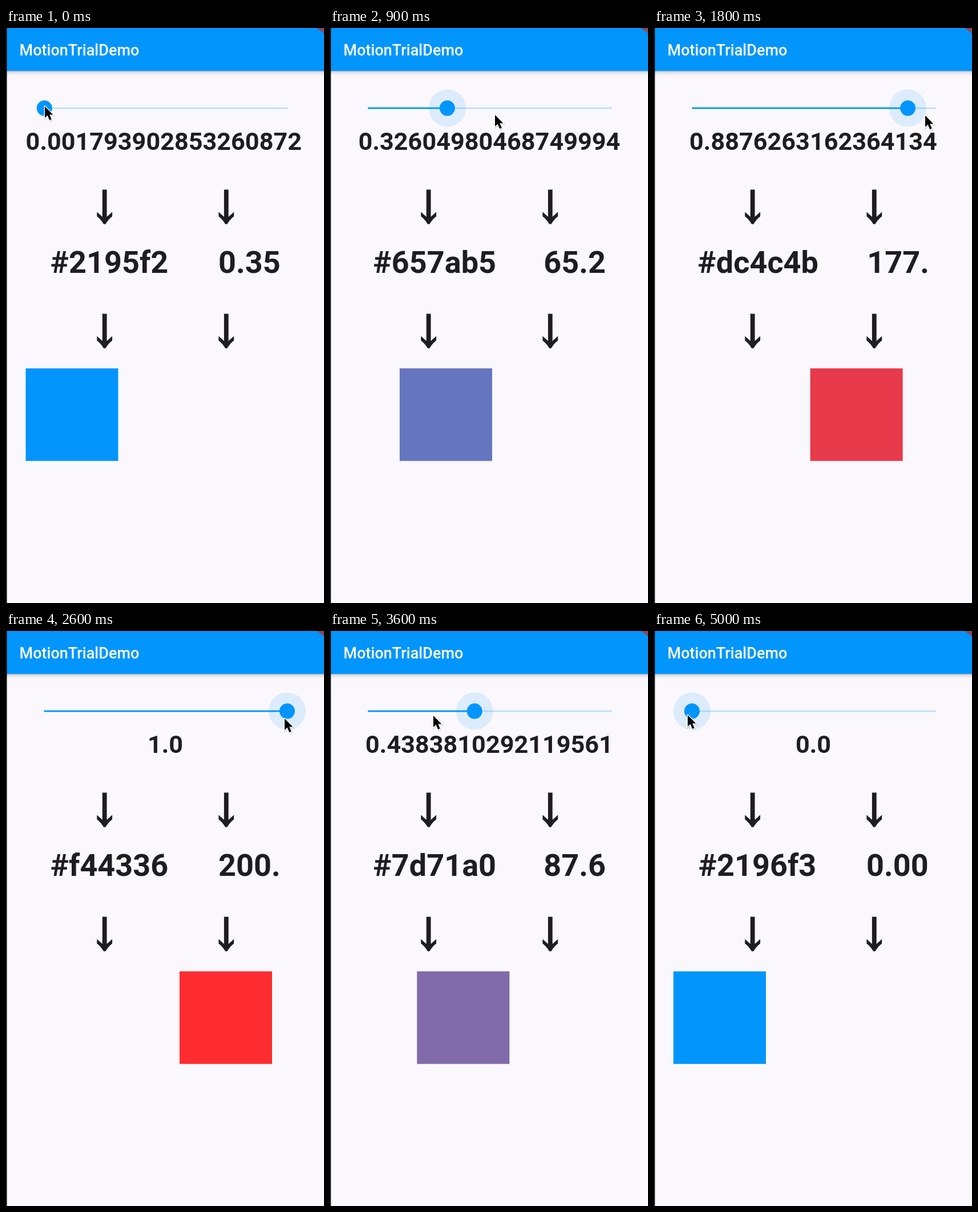
Animation, 557 px wide and 1005 px high, one loop 5100 ms. Source, as an HTML page:

```html
<!DOCTYPE html>
<html lang="en">
<head>
<meta charset="utf-8">
<title>Slider tween</title>
<style>
  html, body { margin: 0; width: 100%; height: 100%; overflow: hidden; background: #faf8fc; }
  svg { display: block; width: 100vw; height: 100vh; }
  text { font-family: Roboto, "Open Sans", sans-serif; font-weight: 700; fill: #1f1d21; }
  .title { font-size: 27px; font-weight: 500; fill: #fff; }
  .value { font-size: 43.2px; text-anchor: middle; }
  .output { font-size: 54px; }
</style>
</head>
<body>
<svg viewBox="0 0 557 1005">
  <defs>
    <linearGradient id="shade" x1="0" y1="0" x2="0" y2="1">
      <stop offset="0" stop-color="#000" stop-opacity=".26"/>
      <stop offset=".35" stop-color="#000" stop-opacity=".08"/>
      <stop offset="1" stop-color="#000" stop-opacity="0"/>
    </linearGradient>
    <path id="arrow" fill="#1f1d21" d="M-3.9 0H3.9V47.5L13.4 39V46.8Q6.5 52 1.7 60.3H-1.7Q-6.5 52 -13.4 46.8V39L-3.9 47.5Z"/>
    <path id="pointer" d="M0 0V20L4.6 15.8L8.2 24L11.8 22.4L8.3 14.5H14.4Z"/>
  </defs>

  <rect width="557" height="1005" fill="#faf8fc"/>
  <rect y="75" width="557" height="9" fill="url(#shade)"/>
  <rect width="557" height="75" fill="#0295fb"/>
  <path d="M544.5 0H557V9.5Z" fill="#8c4660"/>
  <rect width="1.5" height="1005" fill="#000"/>
  <text class="title" x="23.5" y="47.5">MotionTrialDemo</text>

  <rect x="66.5" y="138.7" width="427" height="2.7" fill="#b9e0fa"/>
  <rect id="track" x="66.5" y="138.7" height="2.7" fill="#0295fb"/>
  <circle id="halo" cy="140.1" fill="#0295fb" fill-opacity=".12"/>
  <circle id="knob" cy="140.1" r="13.5" fill="#0295fb"/>

  <text id="value" class="value" y="212.5"></text>
  <text id="hex" class="output" y="427.7"></text>
  <text id="offset" class="output" y="427.7"></text>
  <use href="#arrow" x="172.7" y="282.5"/>
  <use href="#arrow" x="385.8" y="282.5"/>
  <use href="#arrow" x="172.7" y="499.5"/>
  <use href="#arrow" x="385.8" y="499.5"/>
  <rect id="box" y="594.9" width="162" height="161.8"/>

  <g id="cursor">
    <use href="#pointer" x=".6" y="1.6" fill="none" stroke="#000" stroke-opacity=".12" stroke-width="3"/>
    <use href="#pointer" stroke="#fff" stroke-width="2.6" stroke-linejoin="round" paint-order="stroke"/>
  </g>
</svg>
<script>
  const LOOP = 5100, STEP = 100;
  const LEFT = 34, WIDTH = 490.5;

  // Drag right, hold, drag back: [time, progress].
  const DRAG = [
    [0, 0.001793902853260872], [200, 0.001793902853260872],
    [900, 0.32604980468749994], [1800, 0.8876263162364134], [2300, 1], [2700, 1],
    [3600, 0.4383810292119561], [4400, 0.05704398777173875], [4700, 0], [LOOP, 0]
  ];
  // The pointer runs ahead of the knob: [time, x, y].
  const POINTER = [
    [0, 68, 137], [900, 289, 152], [1800, 475, 153], [2600, 488, 153],
    [3600, 181, 148], [4400, 84, 146], [5000, 59, 147]
  ];
  const FROM = [33, 150, 243], TO = [244, 67, 54];
  const BLUE = [2, 149, 251], RED = [255, 45, 48], GAMMA = 1.2;

  const el = Object.fromEntries([...document.querySelectorAll('svg > [id]')].map(n => [n.id, n]));
  const set = (node, attrs) => {
    for (const name in attrs) node.setAttribute(name, attrs[name]);
  };
  const mix = (a, b, k) => a + (b - a) * k;

  // Monotone cubic through the points; flat at ends and turning points.
  function curve(points, t, axis = 1) {
    const last = points.length - 1;
    const secant = i =>
      (points[i + 1][axis] - points[i][axis]) / (points[i + 1][0] - points[i][0]);
    const slope = i => {
      if (i === 0 || i === last) return 0;
      const p = secant(i - 1), q = secant(i);
      return p * q > 0 ? 2 * p * q / (p + q) : 0;
    };
    if (t >= points[last][0]) return points[last][axis];
    let i = 0;
    while (t >= points[i + 1][0]) i++;
    const span = points[i + 1][0] - points[i][0];
    const u = (t - points[i][0]) / span;
    return mix(points[i][axis], points[i + 1][axis], u * u * (3 - 2 * u))
      + span * u * (1 - u) * (slope(i) * (1 - u) - slope(i + 1) * u);
  }

  function tint(v) {
    const channel = (c, i) => mix(c ** GAMMA, RED[i] ** GAMMA, v) ** (1 / GAMMA);
    return `rgb(${BLUE.map((c, i) => Math.round(channel(c, i)))})`;
  }

  function hexCode(v) {
    return '#' + FROM.map((c, i) =>
      Math.floor(mix(c, TO[i], v)).toString(16).padStart(2, '0')).join('');
  }

  function draw(t) {
    const v = curve(DRAG, t);
    const x = 66.5 + 426 * v;
    set(el.track, { width: x - 66.5 });
    set(el.halo, { cx: x, r: 32.5 * Math.min(1, t / 200) });
    set(el.knob, { cx: x });

    const label = Number.isInteger(v) ? v.toFixed(1) : String(v);
    el.value.textContent = label;
    set(el.value, { x: label.length > 19 ? 276.3 : 279 });

    // Equal space around both outputs.
    el.hex.textContent = hexCode(v);
    el.offset.textContent = (200 * v).toFixed(6).slice(0, 4);
    const w = el.hex.getComputedTextLength();
    const gap = (WIDTH - w - el.offset.getComputedTextLength()) / 4;
    set(el.hex, { x: LEFT + gap });
    set(el.offset, { x: LEFT + 3 * gap + w });

    set(el.box, { x: LEFT + 270 * v, fill: tint(v) });
    set(el.cursor, { transform: `translate(${curve(POINTER, t)} ${curve(POINTER, t, 2)})` });
  }

  const start = performance.now();
  function tick() {
    const t = (performance.now() - start) % LOOP;
    draw(Math.floor(t / STEP) * STEP);
    requestAnimationFrame(tick);
  }
  tick();
</script>
</body>
</html>
```
